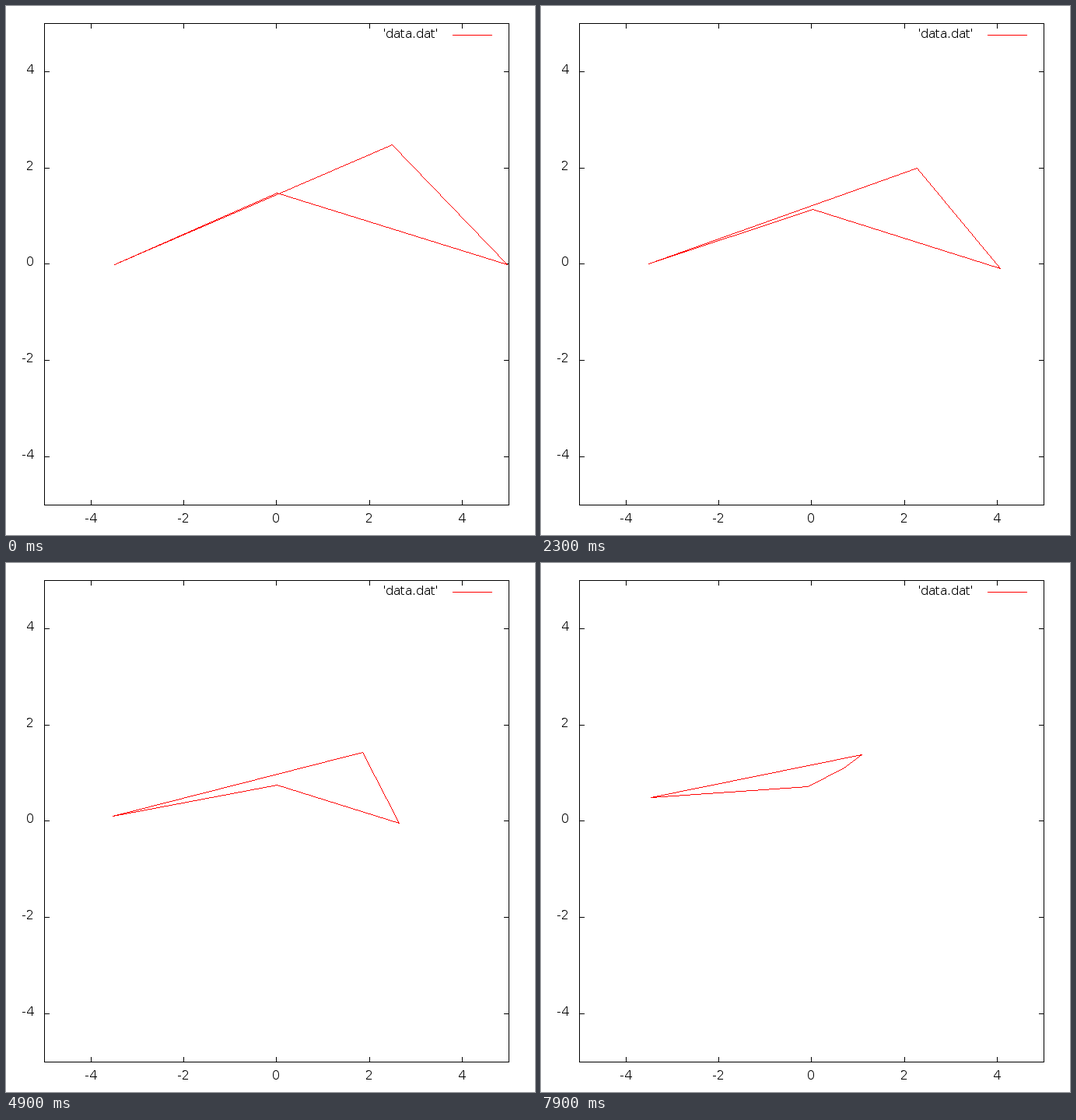
A matplotlib script that plays this animation: 680 by 680 pixels, repeating every 8000 ms.

```python
import numpy as np
import matplotlib.pyplot as plt
from matplotlib.animation import FuncAnimation

SIZE, DPI = 680, 80
PX = 72 / DPI                     # points per pixel
LEFT, RIGHT, TOP, BOTTOM = 49, 646, 22, 641
LIMIT = 5                         # both axes run from -5 to 5
TICK = 6
FRAMES, STEP = 80, 100
DT = 0.1                          # flow time per frame
START = [(-3.5, 0), (0, 1.5), (5, 0), (2.5, 2.5)]

plt.rcParams.update({"font.family": "DejaVu Sans", "text.hinting": "native",
                     "text.hinting_factor": 1})
fig = plt.figure(figsize=(SIZE / DPI, SIZE / DPI), dpi=DPI, facecolor="white")
ax = fig.add_axes([0, 0, 1, 1])
ax.axis("off")


def to_px(p):
    """Data coordinates to the nearest stage pixels."""
    unit = np.array([RIGHT - LEFT, TOP - BOTTOM]) / (2 * LIMIT)
    return np.rint([LEFT, BOTTOM] + (np.asarray(p) + LIMIT) * unit - 0.001)


def line(xs, ys, color="black"):
    ax.plot(xs, ys, color=color, lw=PX, antialiased=False)


def label(x, y, text):
    ax.text(x, y, text, fontsize=16 * PX, ha="left", va="baseline")


def curvature(p):
    """Vector from each corner to its circumcentre, with length 1 / radius."""
    a = np.roll(p, 1, axis=0) - p
    b = np.roll(p, -1, axis=0) - p
    a2, b2 = (a * a).sum(1), (b * b).sum(1)
    area = 2 * (a[:, 0] * b[:, 1] - a[:, 1] * b[:, 0])
    centre = np.column_stack([b[:, 1] * a2 - a[:, 1] * b2,
                              a[:, 0] * b2 - b[:, 0] * a2])
    return centre * (area / (centre ** 2).sum(1))[:, None]


def flow():
    p, shapes = np.array(START, float), []
    for _ in range(FRAMES):
        p = p + DT * curvature(p)
        shapes.append(p)
    return shapes


# Frame, ticks and labels
line([LEFT, RIGHT, RIGHT, LEFT, LEFT], [TOP, TOP, BOTTOM, BOTTOM, TOP])
for v in range(-4, 5, 2):
    x, y = to_px((v, v))
    width = 10 if v >= 0 else 16
    line([x, x], [TOP, TOP + TICK])
    line([x, x], [BOTTOM - TICK, BOTTOM])
    line([LEFT, LEFT + TICK], [y, y])
    line([RIGHT - TICK, RIGHT], [y, y])
    label(x - width / 2, 664, str(v))
    label(36 - width, y + 3, str(v))

# Key
label(485, 41, "'data.dat'")
line([574, 624], [37, 37], "red")

# The polygon is drawn pixel by pixel, so its lines stay thin and hard-edged
canvas = np.zeros((SIZE, SIZE, 4), np.uint8)
layer = ax.imshow(canvas, extent=(0, SIZE, SIZE, 0), aspect="auto",
                  interpolation="nearest", zorder=4)
ax.set_xlim(0, SIZE)
ax.set_ylim(SIZE, 0)
shapes = flow()


def update(n):
    canvas[:] = 0
    pts = to_px(shapes[n])
    for a, b in zip(pts, np.roll(pts, -1, axis=0)):
        count = int(np.abs(b - a).max()) + 1
        xs, ys = np.rint(np.linspace(a, b, count)).astype(int).T
        canvas[ys, xs] = 255, 0, 0, 255
    layer.set_data(canvas)
    return [layer]


anim = FuncAnimation(fig, update, frames=FRAMES, interval=STEP,
                     repeat=True, repeat_delay=0, blit=False)
plt.show()
```
